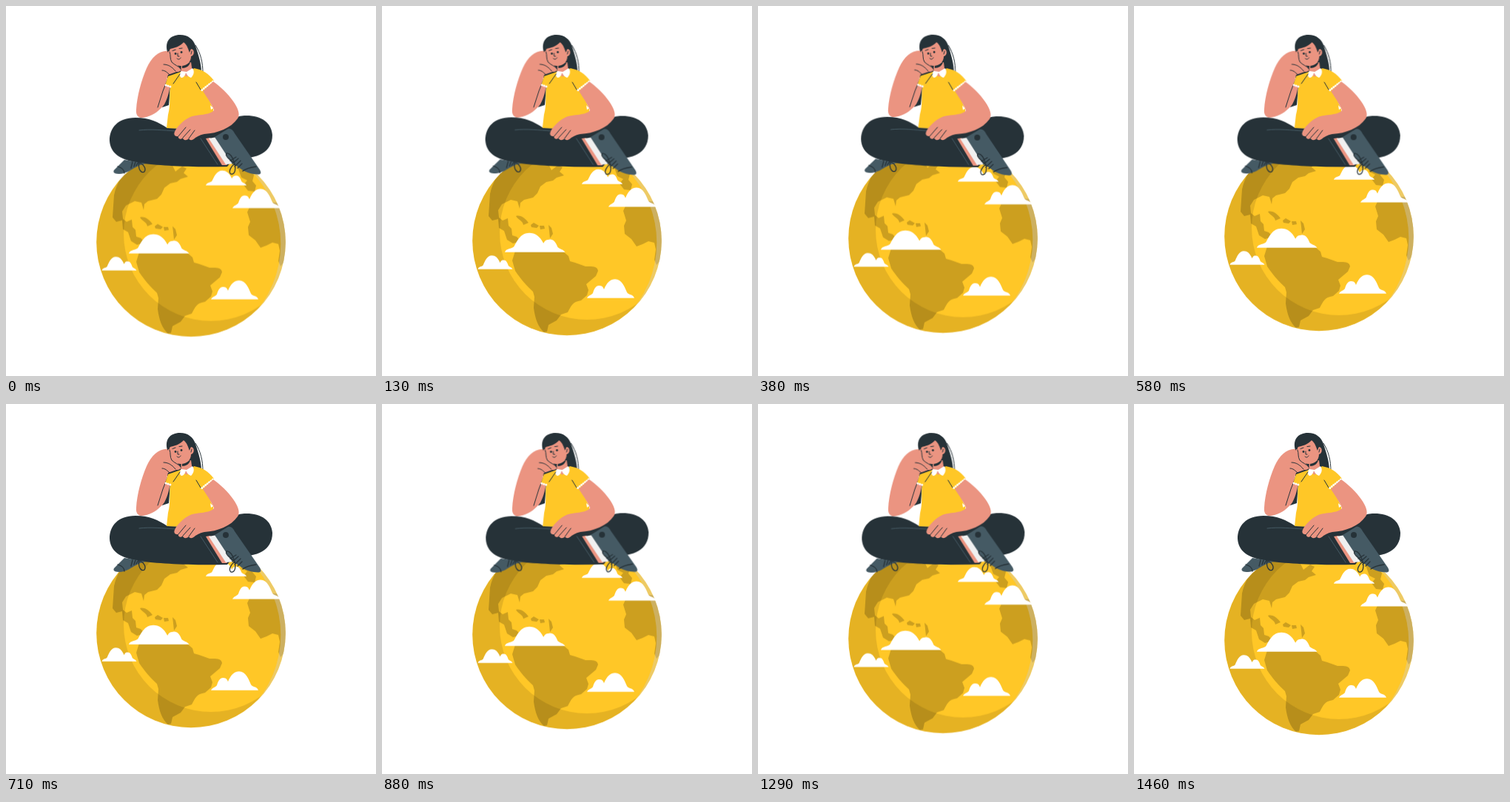
Recreate the animation shown at these times as an HTML page without scripts. Size 500x500 px, loop 1500 ms.

```html
<!DOCTYPE html>
<html lang="en">
<head>
<meta charset="utf-8">
<title>Thinking on top of the world</title>
<style>
  html, body { margin: 0; width: 100%; height: 100%; overflow: hidden; background: #fff; }
  svg { display: block; width: 100%; height: 100%; }

  .globe, .woman { animation: 1.5s linear -30ms infinite; }
  .globe { animation-name: float; }
  .woman { animation-name: sway; transform-origin: 249px 134px; }
  @keyframes float { 50% { transform: translateY(-10px); } }
  @keyframes sway {
    25% { transform: rotate(1deg); }
    75% { transform: rotate(-1deg); }
  }

  .yellow { fill: #ffc727; }
  .dark { fill: #263238; }
  .skin { fill: #eb9481; }
  .slate { fill: #455a64; }
  .white { fill: #fff; }
  .sock { fill: #f0f0f0; }
  .line { fill: none; stroke: #263238; stroke-linecap: round; stroke-linejoin: round; }
  .lace { stroke-width: 1.3; }
  .seam { stroke: #455a64; }
  .frill { fill: none; stroke: #fff; stroke-width: 3; stroke-linecap: round; stroke-dasharray: 0 3.1; }
</style>
</head>
<body>
<svg viewBox="0 0 500 500">
  <defs>
    <clipPath id="disc"><circle cx="250" cy="319.4" r="127.8"/></clipPath>
    <mask id="shade">
      <rect width="500" height="500" fill="#fff"/>
      <circle cx="277" cy="308" r="118"/>
    </mask>
    <mask id="rim">
      <rect width="500" height="500" fill="#fff"/>
      <circle cx="230" cy="322" r="141.3"/>
    </mask>
    <path id="cloud" class="white" d="M0 26C2 22 6 22 8 19C10 12 13 8 17 9C21 9 22 12 23 14C27 4 32 0 38 0C47 0 51 11 54 18C56 22 62 20 64 26Z"/>
  </defs>

  <g class="globe">
    <g clip-path="url(#disc)">
      <rect class="yellow" x="120" y="190" width="260" height="260"/>
      <g opacity=".2">
        <!-- North and Central America -->
        <path d="M168 212C158 228 150 238 146 256L144 286L149 292L157 290L158 302L165 306L169 318L177 323L188 320L182 314L176 312L175 303L171 299L170 289L163 292L158 288L157 278L162 270L174 264L183 266L186 276L187 268L192 264L204 261L210 255L214 246L222 240L231 238L236 234L246 231L240 226L244 220L238 217L229 224L223 212Z"/>
        <!-- Caribbean -->
        <path d="M181 286C188 284 194 290 198 295L191 298C190 292 184 291 181 286ZM201 298L205 295L212 299L209 302L202 301ZM213 299L219 299L220 303L214 304ZM225 298L229 302L231 310L227 316L226 306Z"/>
        <!-- South America -->
        <path d="M181 330L176 346L180 360C186 369 195 380 204 388L206 395L205 410C207 425 211 436 219 443L223 442L225 433L236 427L242 419L251 416C256 407 257 402 269 400L277 393L279 386L276 378L289 367L292 360C291 353 283 354 275 354L261 349L254 347L252 340L245 334L228 322L200 328Z"/>
        <!-- Africa -->
        <path d="M332 266L326 279L330 292L327 299L328 310L337 317L344 327L352 324L360 320L368 322L370 331L368 345L371 352L382 340V266Z"/>
        <!-- Europe -->
        <path d="M312 215L318 232L326 236L321 242L327 250L336 251L338 243L333 237L335 229L330 220Z"/>
      </g>
      <circle cx="250" cy="319.4" r="128" opacity=".1" mask="url(#shade)"/>
      <g mask="url(#rim)">
        <circle cx="250" cy="319.4" r="128" opacity=".1"/>
        <circle class="white" cx="250" cy="319.4" r="128" opacity=".3"/>
      </g>
    </g>
    <use href="#cloud" transform="translate(247.5 308.7) scale(-1.275 1)"/>
    <use href="#cloud" transform="translate(176.5 339.2) scale(-.735 .71)"/>
    <use href="#cloud" transform="translate(325 222.7) scale(-.86 .77)"/>
    <use href="#cloud" transform="translate(306 247.6)"/>
    <use href="#cloud" transform="translate(277 371.3) scale(1 .98)"/>
  </g>

  <g class="woman">
    <!-- hair behind -->
    <path class="dark" d="M218 62C214 48 222 39 235 39C246 39 253 45 256 54C260 66 264 78 264 90L250 92L238 86L222 108L220 134L211 137L218 100Z"/>
    <path class="line" d="M256 53C263 64 266 76 266 91"/>

    <!-- trousers -->
    <path class="dark" d="M218 165C206 157 194 151 175 151C151 151 140 165 140 182C141 199 154 208 180 212C206 216 250 218 299 217L308 206C336 207 360 200 360 174C359 157 344 147 322 148C306 149 296 160 280 166Z"/>
    <path class="line seam" d="M180 168C196 166 212 168 229 169M263 179L286 214"/>

    <!-- left shoe -->
    <path class="slate" d="M160 208L146 222C144 226 148 227 154 227C168 226 173 216 189 213Z"/>
    <path class="line lace" d="M151 217C158 219 160 223 160 226M171 211L169 219M175 211L173 217M179 211L176 216M180 212C178 220 183 227 187 224C190 220 186 214 181 212"/>

    <!-- right shoe -->
    <path class="skin" d="M270 179L276 178L299 215L292 215Z"/>
    <path class="sock" d="M274 179L285 177L309 213L297 214Z"/>
    <path class="slate" d="M282 177L300 166C304 165 307 168 309 172L343 221C347 228 342 228 335 227C324 226 315 218 305 212Z"/>
    <circle class="dark" cx="297" cy="177" r="4"/>
    <path class="line lace" d="M320 223C325 219 331 218 338 217M303 209L311 204M306 213L314 206M309 217L317 209M313 219L319 213M307 211C300 206 296 202 298 199C303 198 307 206 309 213C304 217 300 224 304 227C310 228 311 219 309 213"/>

    <!-- arm holding the head -->
    <path class="skin" d="M221 61C207 59 197 69 190 84C183 100 177 122 176 140C175 150 181 153 190 150C200 147 208 141 214 133C219 124 221 114 222 105L216 104L219 93L236 87Z"/>
    <path class="line" d="M205 137L212 115L219 97"/>

    <!-- neck and shirt -->
    <path class="skin" d="M237 78L250 76L252 90L244 97L236 92Z"/>
    <path class="yellow" d="M236 89L219 95L215 107L222 109C220 124 223 132 219 147L217 165L240 166L281 150L280 139L270 116L281 101C274 91 265 86 254 84L244 96Z"/>
    <path class="white" d="M237 88C234 91 234 95 237 97C240 97 242 94 243 90C245 94 247 96 250 97C254 93 255 88 252 84L244 89Z"/>
    <path class="frill" d="M279.500 102L264 114M216 107L222 109"/>
    <path class="line" d="M235 92L226 105M257 103L263 113"/>

    <!-- face -->
    <path class="dark" d="M238 80L249 76C248 81 243 84 238 84Z"/>
    <path class="skin" d="M221 56C220 68 224 80 236 81C245 81 250 75 250 68C255 67 255 58 250 58L247 52L236 47Z"/>
    <path class="dark" d="M218 63C217 53 224 43 235 42C246 41 253 49 253 58C250 56 249 60 248 63C246 58 245 53 240 49C235 55 226 57 222 58Z"/>
    <circle class="dark" cx="229" cy="64.500" r="1.400"/>
    <circle class="dark" cx="237" cy="62.500" r="1.400"/>
    <path class="line" d="M225 60.500L229 59M234 57.500L238 57M232 64L232 68L234 68M231 71C233 73 235 72 236 70M251 61L250 65"/>

    <!-- hand on the cheek -->
    <path class="skin" d="M221 61C224 67 221 71 225 77C230 80 236 82 236 87C234 90 229 89 226 88C221 93 216 95 210 91L205 72Z"/>
    <path class="line" d="M221 62C223 67 221 71 224 76C228 80 233 81 236 85M213 79C219 79 224 82 229 88M211 87C215 87 218 90 221 93"/>

    <!-- resting arm -->
    <path class="skin" d="M266 115C272 124 280 136 281 141C275 148 259 146 249 150C240 154 231 163 228 170C226 174 229 177 233 176C232 180 237 181 239 178C239 182 245 182 247 179C249 183 253 181 256 178C260 176 262 174 268 173C286 172 304 165 313 152C321 142 300 116 280 102Z"/>
    <path class="white" d="M276 134L280 138L277 140Z"/>
    <path class="line" d="M243 164L233 176M249 167L239 178M255 168L247 179"/>
  </g>
</svg>
</body>
</html>
```
